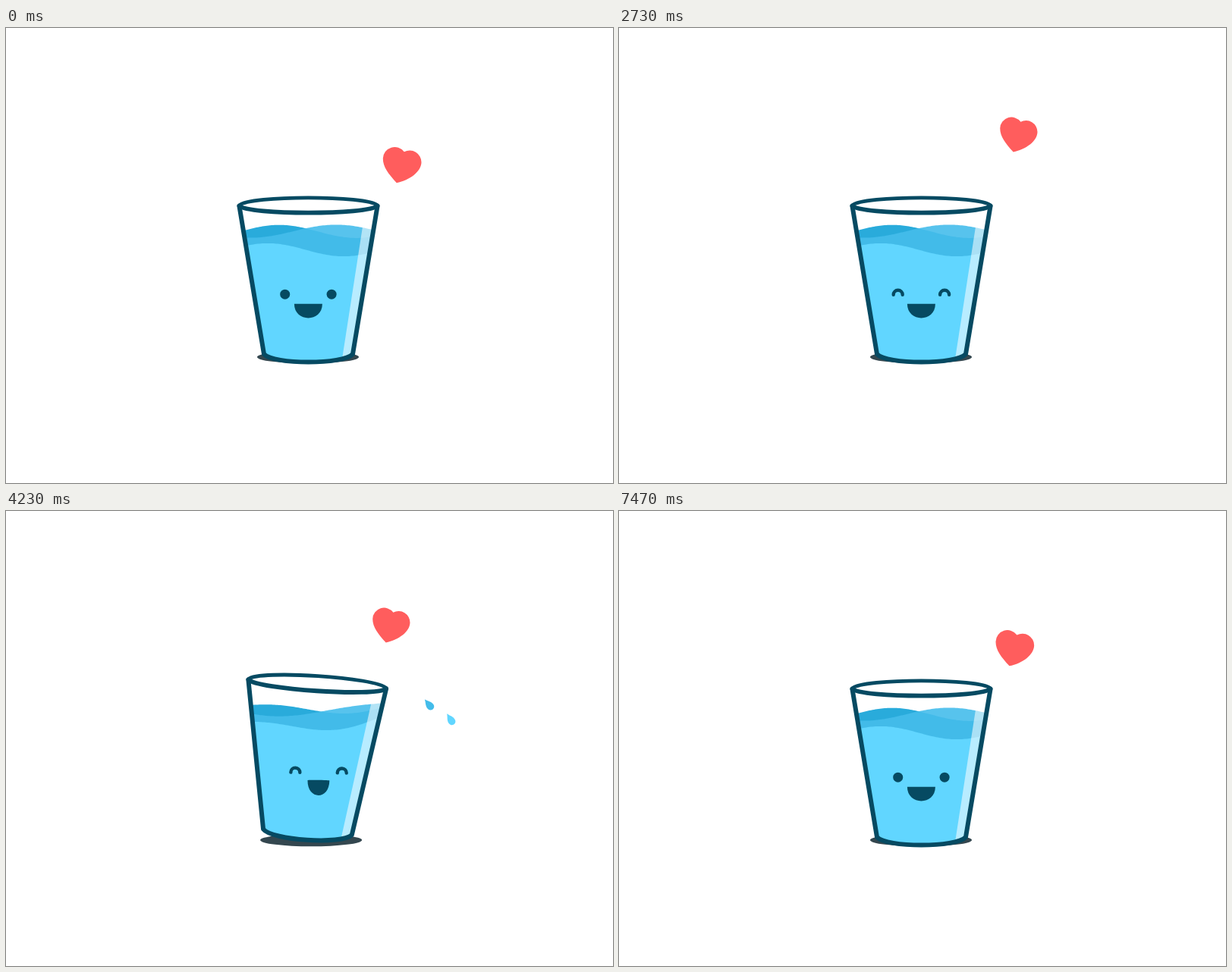
Write an HTML page with a canvas that moves like this. It is 800 by 600 pixels and loops after 7500 ms.

```html
<!DOCTYPE html>
<html>
<head>
<meta charset="utf-8">
<style>
html, body { margin: 0; width: 800px; height: 600px; overflow: hidden; background: #fff; }
canvas { display: block; }
</style>
</head>
<body>
<canvas id="stage" width="800" height="600"></canvas>
<script>
const c = document.getElementById('stage').getContext('2d');
const LOOP = 7500, BOUNCE = 960, TAU = Math.PI * 2;
const INK = '#064a62', WATER = '#61d6ff', MID = '#43bcea', DEEP = '#29abdb';

const clamp = u => Math.max(0, Math.min(1, u));

// Rises from 0 to 1 and falls back within the given span.
const pulse = (t, start, span) => Math.sin(Math.PI * clamp((t - start) / span)) ** 2;

// Smooth closed curve through [time, x, y] keys.
function drift(t, keys, axis) {
  const n = keys.length;
  const at = i => [keys[(i + n) % n][0] + Math.floor(i / n) * LOOP, keys[(i + n) % n][axis]];
  let i = n - 1;
  while (keys[i][0] > t) i--;
  const [p, a, b, q] = [-1, 0, 1, 2].map(d => at(i + d));
  const h = b[0] - a[0], u = (t - a[0]) / h;
  const va = (b[1] - p[1]) / (b[0] - p[0]) * h;
  const vb = (q[1] - a[1]) / (q[0] - a[0]) * h;
  return a[1] + (b[1] - a[1]) * u * u * (3 - 2 * u)
    + va * u * (1 - u) ** 2 - vb * u * u * (1 - u);
}

const heartKeys = [
  [0, 522.3, 180.5], [1440, 526.7, 157], [2730, 527, 140.5], [3540, 518.5, 138.5],
  [4230, 508, 150.5], [5220, 495.3, 158], [6270, 499.5, 171.5]
];
const heartShape = new Path2D('M-7.5 23.7C-18 12-25.5 3-25.5-8.5A15.5 15.5 0 0 1 2.5-17.2' +
  'A15.5 15.5 0 0 1 25.2-3.5C25 9 10 20-7.5 23.7Z');
const dropShape = new Path2D('M-9 0C-4-2-2-4.8 3-4.8A4.8 4.8 0 0 1 3 4.8C-2 4.8-4 2-9 0Z');
const bodyShape = new Path2D('M307.5 235L340 430C352 444 445 444 457 430L489.5 235');
const rimTop = new Path2D('M307.5 234C320 220.5 477 220.5 489.5 234');
const rimBottom = new Path2D('M307.5 234.5C320 246.6 477 246.6 489.5 234.5');
const rim = new Path2D(rimTop);
rim.addPath(rimBottom);
const shine = new Path2D('M474.5 233L441.5 446H500V233Z');

// Two bounces, then one decaying wobble to the left and right, then a word.
function pose(t) {
  const bouncing = t < 2 * BOUNCE;
  const bounce = bouncing ? pulse(t % BOUNCE, 0, BOUNCE) : 0;
  const u = clamp((t - 3110) / 1500), wave = Math.sin(TAU * u), decay = 1 - .63 * u;
  const lift = wave * wave * decay;
  return {
    tilt: -7.1 * wave * decay,
    hop: -10.2 * bounce - 12.7 * lift,
    slosh: -1.42 * wave * (1 - u),
    turn: bouncing ? t / BOUNCE : Math.sin(Math.PI / 2 * u),
    mouth: bounce + lift + pulse(t, 5850, 800),
    open: 1 - .9 * (pulse(t, 5940, 180) + pulse(t, 6390, 180)),
    happy: t >= 2400 && t < 4860
  };
}

function fill(path, color) {
  c.fillStyle = color;
  c.fill(path);
}

function stroke(path, width) {
  c.strokeStyle = INK;
  c.lineWidth = width;
  c.lineCap = c.lineJoin = 'round';
  c.stroke(path);
}

function disc(x, y, rx, ry, color) {
  c.beginPath();
  c.ellipse(x, y, rx, ry, 0, 0, TAU);
  c.fillStyle = color;
  c.fill();
}

// Runs a drawing inside a moved, turned and scaled frame.
function placed(x, y, angle, scale, paint) {
  c.save();
  c.translate(x, y);
  c.rotate(angle);
  c.scale(scale, scale);
  paint();
  c.restore();
}

function drawHeart(t) {
  const beat = .951 + .049 * Math.cos(TAU * t / 1500);
  placed(drift(t, heartKeys, 1), drift(t, heartKeys, 2), 0, beat,
    () => fill(heartShape, '#ff5d5d'));
}

// Each swing throws a light drop and a slower, darker one after it.
function drawDrops(t) {
  const g = .00063;
  for (const side of [-1, 1]) {
    for (const i of [0, 1]) {
      const age = t - (side < 0 ? 3450 : 3880) - 95 * i;
      if (age < 0 || age > 360) continue;
      const vx = side * (.22 - .01 * i), vy = -.095 + .03 * i;
      const x = 398 + side * (111 - 5 * i) + vx * age;
      const y = 231 + vy * age + g * age * age;
      placed(x, y, Math.atan2(vy + 2 * g * age, vx), Math.min(1, .3 + age / 80),
        () => fill(dropShape, i ? MID : WATER));
    }
  }
}

// One sheet of water: a travelling wave, blended with a sloped slosh.
function drawSheet(level, peak, length, low, slosh, color) {
  const k = Math.abs(slosh);
  c.beginPath();
  c.moveTo(300, 450);
  for (let x = 300; x <= 500; x += 2) {
    const wave = level - 8.6 * Math.cos(TAU * (x - peak) / length);
    const u = Math.max(0, slosh < 0 ? 475 - x : x - 322) / 160;
    c.lineTo(x, wave * (1 - k) + (low - (low - 241) * u ** 2.5) * k);
  }
  c.lineTo(500, 450);
  c.fillStyle = color;
  c.fill();
}

function drawWater({ turn, slosh }) {
  drawSheet(268.3, 360 + turn * 204, 204, 276, slosh, DEEP);
  drawSheet(268, 435 - turn * 225, 225, 288, slosh, 'rgba(69,189,235,.9)');
  drawSheet(292.5, 345 + turn * 200, 200, 299, slosh, WATER);
  fill(shine, 'rgba(255,255,255,.55)');
}

function drawFace({ happy, open, mouth }) {
  for (const x of [-30.7, 30.7]) {
    if (happy) stroke(new Path2D(`M${x - 6} -8.2A6 6 0 0 1 ${x + 6} -8.2`), 4.4);
    else disc(x, -8.8, 6.5, 6.5 * open, INK);
  }
  // Half disc when smiling, full disc when the mouth is open.
  const w = 18.5 - 7.7 * mouth;
  const top = 3.8 - 4.2 * mouth, bottom = 22.4 - 1.2 * mouth;
  const y = top + 10.7 * mouth ** 5;
  const up = y - (y - top) * 4 / 3, down = y + (bottom - y) * 4 / 3;
  fill(new Path2D(`M${-w} ${y}C${-w} ${up} ${w} ${up} ${w} ${y}` +
    `C${w} ${down} ${-w} ${down} ${-w} ${y}Z`), INK);
}

function drawGlass(p) {
  const angle = p.tilt * Math.PI / 180;
  disc(398 + p.tilt * 1.1, 434, 67, 8.3, '#34474f');
  placed(398.5 - .3 * Math.abs(p.tilt), 431 + p.hop, angle, 1, () => {
    c.translate(-398.5, -431);
    fill(bodyShape, '#fff');
    c.save();
    c.clip(bodyShape);
    drawWater(p);
    c.restore();
    fill(rim, '#fff');
    stroke(bodyShape, 6);
    stroke(rimTop, 4.8);
    stroke(rimBottom, 5.8);
  });
  // The face leans further than the glass but stays nearly level.
  placed(398.4 + p.tilt * 3.6, 360 + p.hop, angle * .2, 1, () => drawFace(p));
}

function draw() {
  const t = Math.floor(performance.now() % LOOP / 30) * 30;
  c.fillStyle = '#fff';
  c.fillRect(0, 0, 800, 600);
  drawDrops(t);
  drawGlass(pose(t));
  drawHeart(t);
  requestAnimationFrame(draw);
}
draw();
</script>
</body>
</html>
```
